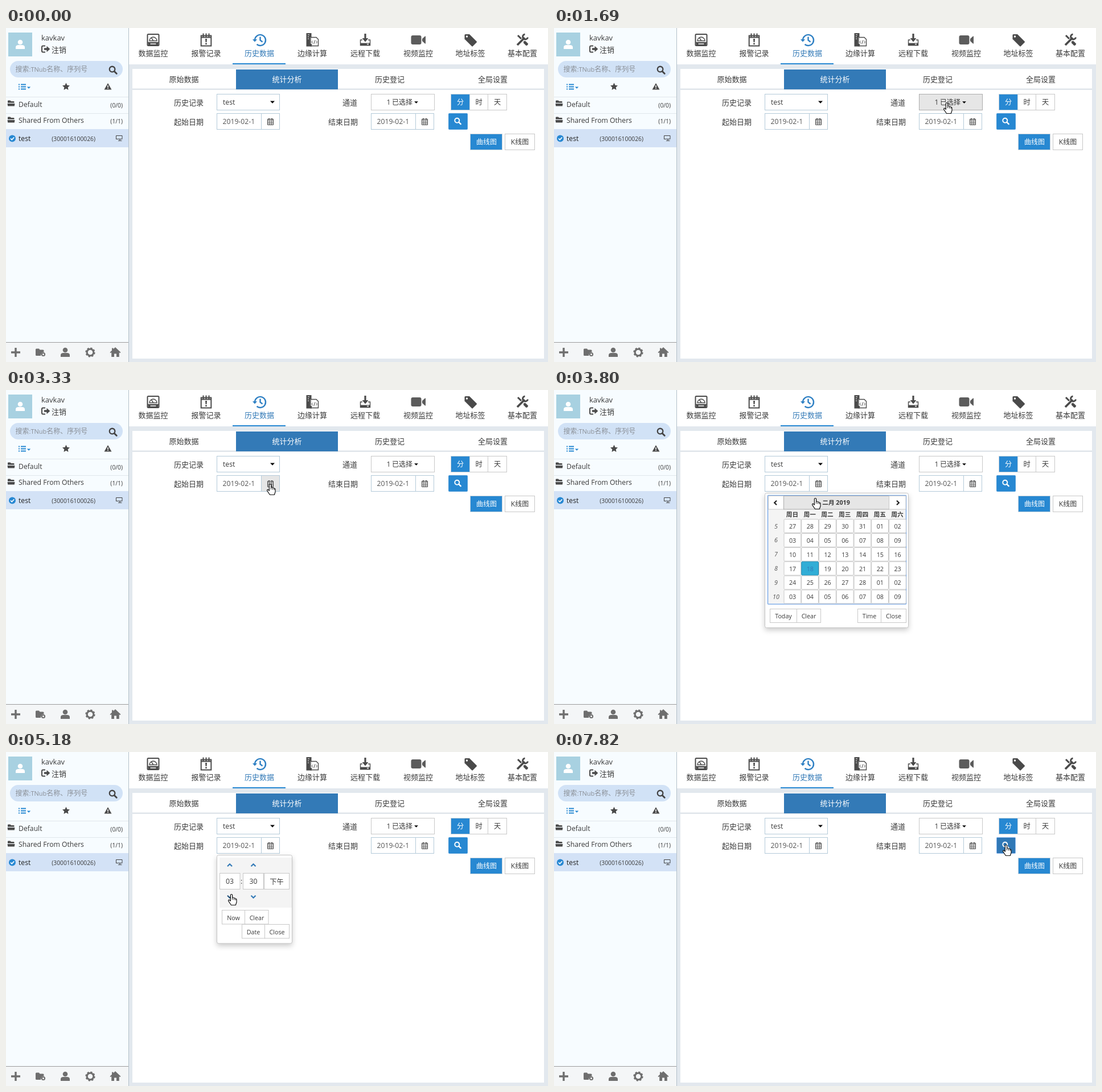
An HTML page for the animation above (7990 ms loop, 952x588 px).

```html
<!DOCTYPE html>
<html lang="zh-CN">
<head>
<meta charset="utf-8">
<title>Statistics</title>
<style>
html, body { margin: 0; width: 100%; height: 100%; overflow: hidden; background: #e2e8ee; }
svg { display: block; width: 952px; height: 588px; }
text { font: 12.2px "Open Sans", "Noto Sans CJK SC", "Noto Sans CJK", sans-serif; fill: #3a3a3a; }
.cn text, text.cn { font-size: 13px; }
.mid, .mid text { text-anchor: middle; }
.sm text, text.sm { font-size: 10.7px; }
text.tw { font-size: 12px; }
text.ten { font-size: 10.2px; }
.id { font-size: 10.3px; text-anchor: end; }
.bold { font-weight: 700; }
.week { font-style: italic; fill: #555; }
.w, .w text { fill: #fff; }
.blue { fill: #2788d2; }
.link { fill: #337ab7; }
.btn { fill: #fff; stroke: #c8c8c8; }
.on { fill: #2788d2; stroke: #c8d3dc; }
.field { fill: #fff; stroke: #b4cad9; }
.line { fill: none; stroke: #4a4a4a; stroke-width: 2; }
.thin { stroke-width: 1.4; }
.ico { fill: #4a4a4a; }
.foot { fill: #6e6e6e; }
.gear { fill: none; stroke: #6e6e6e; }
.pop { fill: #fff; stroke: #c4c4c4; filter: drop-shadow(0 4px 5px rgba(0,0,0,.2)); }
.chev { fill: none; stroke: #222; stroke-width: 2.2; }
.chev.c { stroke: #337ab7; }

/* every state switches hard within one 7990 ms loop */
.a { animation: 7990ms step-end infinite; }
#cursor { animation-name: move; }
#arrow { animation-name: arrow; }
#hand { animation-name: hand; }
#select { animation-name: select; }
#channel { animation-name: channel; }
#press { animation-name: press; }
#dateBtn { animation-name: dateBtn; }
#menu { animation-name: menu; }
#calendar { animation-name: calendar; }
#frame { --w: 252px; width: var(--w); animation-name: grow; }
#table { --w: 243px; width: var(--w); animation-name: grow, focus; }
#ends { animation-name: shift; }
#extra { animation-name: extra; }
#title { animation-name: title; }
#time { animation-name: time; }
#down { animation-name: down; }
#ring { animation-name: ring; }
#h3 { animation-name: h3; }
#h2 { animation-name: h2; }
#h1 { animation-name: h1; }
#search { animation-name: search; }

@keyframes move {
  0% { transform: translate(958px,634px); }
  1.62% { transform: translate(958px,634px); animation-timing-function: steps(2,jump-both); }
  3.7% { transform: translate(690px,413px); }
  4.75% { transform: translate(627px,430px); }
  6.63% { transform: translate(627px,430px); animation-timing-function: steps(6,jump-both); }
  12.51% { transform: translate(462px,142px); }
  13.47% { transform: translate(462px,142px); animation-timing-function: steps(3,jump-both); }
  16.39% { transform: translate(617px,133px); }
  17.27% { transform: translate(617px,133px); animation-timing-function: steps(4,jump-both); }
  21.15% { transform: translate(690px,131px); }
  30.91% { transform: translate(690px,131px); animation-timing-function: steps(3,jump-both); }
  33.79% { transform: translate(461px,251px); }
  36.66% { transform: translate(461px,251px); animation-timing-function: steps(5,jump-both); }
  41.67% { transform: translate(464px,165px); }
  47.55% { transform: translate(459px,190px); }
  48.52% { transform: translate(459px,190px); animation-timing-function: steps(5,jump-both); }
  53.31% { transform: translate(449px,312px); }
  55.19% { transform: translate(449px,312px); animation-timing-function: steps(2,jump-both); }
  57.31% { transform: translate(450px,264px); }
  58.19% { transform: translate(450px,264px); animation-timing-function: steps(7,jump-both); }
  64.83% { transform: translate(396px,250px); }
  84.31% { transform: translate(396px,250px); animation-timing-function: steps(5,jump-both); }
  89.11% { transform: translate(621px,234px); }
  91.11% { transform: translate(621px,234px); animation-timing-function: steps(6,jump-both); }
  96.9%, 100% { transform: translate(794px,163px); }
}
@keyframes hand {
  0%, 13.47%, 30.91%, 84.31% { opacity: 0; }
  12.51%, 18.23%, 40.67%, 96.9%, 100% { opacity: 1; }
}
@keyframes arrow {
  0%, 13.47%, 30.91%, 84.31% { opacity: 1; }
  12.51%, 18.23%, 40.67%, 96.9%, 100% { opacity: 0; }
}
@keyframes select {
  0%, 13.47%, 100% { fill: #fff; stroke: #b4cad9; }
  12.51% { fill: #e6e6e6; stroke: #b0bcc4; }
}
@keyframes channel {
  0%, 36.66%, 100% { fill: #fff; stroke: #c8c8c8; }
  18.23% { fill: #e6e6e6; stroke: #adadad; }
  25.15% { fill: #e2e2e2; stroke: #8c8c8c; }
}
@keyframes press { 0%, 36.66%, 100% { opacity: 0; } 25.15% { opacity: 1; } }
@keyframes dateBtn {
  0%, 47.55%, 100% { fill: #fff; }
  40.67% { fill: #e6e6e6; }
  43.55% { fill: #d6d6d6; }
}
@keyframes menu { 0%, 36.66%, 100% { opacity: 0; } 26.09% { opacity: 1; } }
@keyframes calendar { 0%, 58.19%, 100% { opacity: 0; } 45.43% { opacity: 1; } }
@keyframes grow { 55.19%, 100% { width: calc(var(--w) + 215px); } }
@keyframes focus { 0% { stroke: transparent; } 47.55%, 100% { stroke: #84b0ea; } }
@keyframes shift { 55.19%, 100% { transform: translate(215px,0); } }
@keyframes extra { 0%, 58.19%, 100% { opacity: 0; } 55.19% { opacity: 1; } }
@keyframes title {
  0%, 49.4%, 100% { fill: #fff; stroke: #c8c8c8; }
  47.55% { fill: #e6e6e6; stroke: #adadad; }
}
@keyframes time { 0%, 89.11%, 100% { opacity: 0; } 58.19% { opacity: 1; } }
@keyframes down { 0%, 84.31%, 100% { stroke: #337ab7; } 64.83% { stroke: #23527c; } }
@keyframes ring { 0%, 89.11%, 100% { opacity: 0; } 65.83% { opacity: 1; } }
@keyframes h3 { 0% { opacity: 1; } 67.83%, 100% { opacity: 0; } }
@keyframes h2 { 0%, 71.84%, 100% { opacity: 0; } 67.83% { opacity: 1; } }
@keyframes h1 { 0% { opacity: 0; } 71.84%, 100% { opacity: 1; } }
@keyframes search {
  0% { fill: #2788d2; stroke: #4897d6; }
  96.9% { fill: #3078b6; stroke: #2a6ca6; }
  97.87%, 100% { fill: #3078b6; stroke: #86b4ee; }
}
</style>
</head>
<body>
<svg viewBox="0 0 952 588">
<defs>
  <g id="lens"><circle cx="-1.2" cy="-1.2" r="4" fill="none" stroke-width="1.9"/><path d="M2 2L5.2 5.2" stroke-width="2.4" stroke-linecap="round"/></g>
  <g id="cal" fill="none" stroke="#444"><path d="M-5-4.5H5V5.5H-5Z"/><path d="M-5-2.5H5M-5 .5H5M-5 3H5M-1.7-2V5M1.7-2V5" stroke-width=".8"/><path d="M-2.5-6V-3.5M2.5-6V-3.5" stroke-width="1.7"/></g>
  <path id="tick" d="M-4.5 0L-1.5 3L4.5-3" fill="none" stroke="#222" stroke-width="2.6"/>
  <path id="caret" d="M-4-2H4L0 2.2Z"/>
  <path id="left" d="M2-3.8L-1.8 0L2 3.8"/>
  <path id="up" d="M-4 2.2L0-1.8L4 2.2"/>
  <path id="folder" d="M-6-4.5Q-6-5.5-5-5.5H-1.5L0-4H4.5Q5.5-4 5.5-3V-1.3H-6ZM-6.5 0H6.5L5.8 4.5H-5.8Z"/>
  <g id="person"><circle cy="-4" r="4.3"/><path d="M-8 8V5Q-8 1-3 1H3Q8 1 8 5V8Z"/></g>
</defs>

<rect width="952" height="588" fill="#e2e8ee"/>

<!-- sidebar -->
<rect width="215" height="588" fill="#f7fcff"/>
<rect x="4" y="8" width="42" height="42" fill="#a8d1e1"/>
<use href="#person" class="w" transform="translate(25 29)"/>
<text x="62" y="22" class="cn">kavkav</text>
<path d="M69 31.5H65Q63 31.5 63 33.5V40.5Q63 42.5 65 42.5H69" class="line"/>
<path d="M67 35.2H71.5V31.8L77.3 37L71.5 42.2V38.8H67Z" class="ico"/>
<text x="80" y="42.5" class="cn">注销</text>
<rect x="7" y="58" width="198" height="29" rx="14.5" fill="#d1e2f6"/>
<text x="16.5" y="77" class="tw" style="fill:#8a8f96">搜索<tspan font-size="11">:TNub</tspan>名称、序列号</text>
<use href="#lens" stroke="#444" transform="translate(188 74) scale(1.2)"/>
<path d="M22 99.5H24M22 103.5H24M22 107.5H24M26 99.5H35M26 103.5H35M26 107.5H35" stroke="#2788d2" stroke-width="2"/>
<use href="#caret" class="blue" transform="translate(40 105) scale(.8)"/>
<path d="M105.5 96.5L107.5 100.8L112 101.3L108.7 104.5L109.5 109L105.5 106.8L101.5 109L102.3 104.5L99 101.3L103.5 100.8Z" class="ico"/>
<path d="M179 97L185.5 108.5H172.5Z" class="ico"/>
<path d="M179 101V104.5M179 105.6V107" stroke="#fff" stroke-width="1.6"/>
<path d="M0 121.5H215M0 150.5H215" stroke="#e1e7eb"/>
<rect y="178" width="215" height="32" fill="#d3e2f6"/>
<g class="ico"><use href="#folder" x="9" y="133"/><use href="#folder" x="9" y="162"/></g>
<text x="22" y="139">Default</text>
<text x="205" y="140" class="id">(0/0)</text>
<text x="22" y="167">Shared From Others</text>
<text x="205" y="168" class="id">(1/1)</text>
<circle cx="11" cy="194.5" r="6" class="blue"/>
<path d="M8 194.5L10.3 196.8L14.2 192.5" fill="none" stroke="#fff" stroke-width="1.7"/>
<text x="22" y="199" style="fill:#222">test</text>
<text x="157" y="198.5" class="id">(300016100026)</text>
<path d="M193.5 195.5V189.5H204V195.5H196M200 196V198.5M197 198.5H203.5M193 195.5H196" fill="none" stroke="#444"/>
<rect y="553" width="215" height="35" fill="#f4f6f7"/>
<path d="M0 553.5H215" stroke="#9b9b9b"/>
<g class="foot">
  <path d="M15.3 563H18.7V569.3H25V572.7H18.7V579H15.3V572.7H9V569.3H15.3Z"/>
  <path d="M52 566Q52 564.5 53.5 564.5H58L59.5 566.5H65Q66.5 566.5 66.5 568V570.5Q62 570 61 577H53.5Q52 577 52 575.5Z"/>
  <circle cx="65.5" cy="574.5" r="2.6" class="gear" stroke-width="2"/>
  <use href="#person" x="104" y="571"/>
  <circle cx="148" cy="571" r="5.8" class="gear" stroke-width="3"/>
  <circle cx="148" cy="571" r="7.6" class="gear" stroke-width="2" stroke-dasharray="3.4 2.57"/>
  <path d="M192 562L201.5 571L200.3 572.3L198.8 571V579H194V573.5H190V579H185.2V571L183.7 572.3L182.5 571L186 567.7V563.5H188.5V565.3Z"/>
</g>
<path d="M215.5 0V588" stroke="#b3c0c9"/>

<!-- top navigation -->
<rect x="216" width="736" height="64" fill="#fff"/>
<rect x="398" y="62" width="93" height="2" class="blue"/>
<g transform="translate(258.5 21)">
  <rect x="-10" y="-10" width="20" height="20" rx="1.5" class="line"/>
  <path d="M-6.5 1.5A6.5 6.5 0 0 1 6.5 1.5Z" class="line thin"/>
  <path d="M0 1L-3-3.5M-10 4.5H10" class="line thin"/>
  <path d="M-9 5H9V9H-9Z" class="ico"/><path d="M-5 7H5" stroke="#fff" stroke-width="1.5"/>
</g>
<g transform="translate(351.5 21)">
  <rect x="-8.8" y="-7.5" width="17.6" height="18" class="line"/>
  <path d="M-9-4.5H9M-5-11.5V-5M0-11.5V-5M5-11.5V-5" class="line"/>
  <path d="M-1.5-2H1.5L1 4H-1ZM-1.3 5.5H1.3V8H-1.3Z" class="ico"/>
</g>
<g transform="translate(445.5 21)" fill="none" stroke="#2d7fc3" stroke-width="2.4">
  <path d="M-8.5 1A9.5 9.5 0 1 1-5 7.8"/><path d="M1-5.5V.5L5 3.5"/><path d="M-12.5-1H-4.5L-8.5 3.5Z" fill="#2d7fc3" stroke="none"/>
</g>
<g transform="translate(538 21)">
  <path d="M-10.5-12H-1.5V-5H-4V7H-1V11.5H-10.5Z" class="ico"/>
  <path d="M-8-9H-5M-8-5.5H-6M-8-2H-6" stroke="#fff"/>
  <path d="M-3-4.5H7L10.5-1V10.5H-3Z" class="line thin"/>
  <path d="M1 1.5L-1 3.7L1 6M6.5 1.5L8.5 3.7L6.5 6M4.7 .5L2.8 7" fill="none" stroke="#4a4a4a"/>
</g>
<g transform="translate(631 21)">
  <path d="M-1.6-11H1.6V-3H5.5L0 3.5L-5.5-3H-1.6Z" class="ico"/>
  <path d="M-5 0H-8.5V9.5H8.5V0H5" class="line thin"/><path d="M-8 5.5H8V9.5H-8Z" class="ico"/><path d="M3 7.5H6" stroke="#fff" stroke-width="1.5"/>
</g>
<g transform="translate(724 21)" fill="#5c5c5c"><rect x="-12.5" y="-8" width="18" height="16" rx="3"/><path d="M7-2L12-6.5H13V6.5H12L7 2Z"/></g>
<g transform="translate(815.5 21)"><path d="M-10-8.5Q-10-10-8.5-10H-1.5L11 2.5Q12 3.5 11 4.5L4.5 11Q3.5 12 2.5 11L-10-1.5Z" class="ico"/><circle cx="-6" cy="-6" r="1.7" class="w"/></g>
<g transform="translate(907 21)" class="line" style="stroke-width:3">
  <path d="M-8-8L-2-2M2.5 2.5L9 9"/><path d="M-9 9L4-4" stroke-width="3.8"/><path d="M4.5-10A4.5 4.5 0 1 0 9.5-4.5"/><path d="M3.5 3.5L8.5 8.5" stroke-width="5"/>
</g>
<g class="cn mid">
  <text x="258.5" y="49">数据监控</text><text x="351.5" y="49">报警记录</text>
  <text x="445" y="49" class="link">历史数据</text><text x="538" y="49">边缘计算</text>
  <text x="631" y="49">远程下载</text><text x="724" y="49">视频监控</text>
  <text x="815.5" y="49">地址标签</text><text x="907" y="49">基本配置</text>
</g>

<!-- panel and tabs -->
<rect x="222" y="72" width="723" height="510" fill="#fff"/>
<rect x="222" y="106.5" width="723" height="2.5" fill="#dfe5ea"/>
<rect x="404" y="73" width="179" height="35" class="link"/>
<g class="cn mid">
  <text x="312.5" y="95">原始数据</text><text x="493.5" y="95" class="w">统计分析</text>
  <text x="674" y="95">历史登记</text><text x="855" y="95">全局设置</text>
</g>

<!-- form -->
<g class="cn">
  <text x="295" y="136">历史记录</text><text x="591" y="136">通道</text>
  <text x="295" y="170">起始日期</text><text x="566" y="170">结束日期</text>
</g>
<rect id="select" class="field a" x="370.5" y="116.5" width="110" height="28"/>
<text x="381" y="135">test</text>
<use href="#caret" x="468" y="130.5"/>
<rect id="channel" class="btn a" x="641.5" y="116.5" width="111" height="28"/>
<path id="press" class="a" d="M642 118H752M642.5 118V144" stroke="#bbb" stroke-width="2" fill="none"/>
<text x="668.5" y="135">1</text><text x="678" y="135" class="tw">已选择</text>
<use href="#caret" transform="translate(720.5 131) scale(.85)"/>
<rect class="field" x="370.5" y="150.5" width="78" height="28"/>
<rect id="dateBtn" class="field a" x="448.5" y="150.5" width="32" height="28"/>
<rect class="field" x="641.5" y="150.5" width="78" height="28"/>
<rect class="field" x="719.5" y="150.5" width="32" height="28"/>
<text x="380.5" y="169" style="fill:#555">2019-02-1</text>
<text x="651.5" y="169" style="fill:#555">2019-02-1</text>
<use href="#cal" x="464.5" y="165"/><use href="#cal" x="735.5" y="165"/>
<rect class="btn" x="814.5" y="116.5" width="32" height="28"/>
<rect class="btn" x="846.5" y="116.5" width="33" height="28"/>
<rect class="on" x="781.5" y="116.5" width="33" height="28"/>
<g class="mid">
  <text x="798" y="135" class="w">分</text><text x="830.5" y="135">时</text><text x="863" y="135">天</text>
</g>
<rect id="search" class="a" x="777.5" y="150.5" width="33" height="28" rx="1"/>
<use href="#lens" stroke="#fff" x="793.5" y="164"/>
<rect class="on" x="815.5" y="186.5" width="56" height="28"/>
<rect class="btn" x="876.5" y="186.5" width="52" height="28"/>
<g class="mid"><text x="844" y="205" class="w tw">曲线图</text><text x="902.5" y="205" class="tw">K线图</text></g>

<!-- channel menu -->
<g id="menu" class="a">
  <rect class="pop" x="641.5" y="147.5" width="132" height="248" rx="3"/>
  <path d="M642 203.5H773" stroke="#e0e0e0"/>
  <use href="#tick" x="661" y="164"/><use href="#tick" x="661.5" y="216.5"/>
  <path d="M657.5 186.5L664 193M664 186.5L657.5 193" stroke="#222" stroke-width="2.6"/>
  <text x="668" y="168" class="ten">选择全部</text>
  <text x="668" y="194" class="ten">取消全选</text>
  <text x="671" y="221">text</text>
</g>

<!-- date picker -->
<g id="calendar" class="a sm mid">
  <rect id="frame" class="pop a" x="370.5" y="181.5" height="237" rx="3"/>
  <rect id="table" class="a" x="375.5" y="185.5" height="191.5" rx="1" fill="#f4f4f4" stroke-width="1.6"/>
  <rect class="btn" x="376.5" y="186.5" width="27" height="23.5"/>
  <rect id="title" class="btn a" x="403.5" y="186.5" width="185" height="23.5"/>
  <rect class="btn" x="588.5" y="186.5" width="29.5" height="23.5"/>
  <use href="#left" class="chev" x="389" y="198.5"/>
  <use href="#left" class="chev" transform="translate(604 198.5) scale(-1 1)"/>
  <text x="495.5" y="202" class="bold">二月 2019</text>
  <g id="days"></g>
  <g id="extra" class="a"></g>
  <rect class="btn" x="379.5" y="385.5" width="47" height="24"/><text x="403" y="402">Today</text>
  <rect class="btn" x="426.5" y="385.5" width="42" height="24"/><text x="447.5" y="402">Clear</text>
  <g id="ends" class="a">
    <rect class="btn" x="533.5" y="385.5" width="41" height="24"/><text x="554" y="402">Time</text>
    <rect class="btn" x="574.5" y="385.5" width="44" height="24"/><text x="596.5" y="402">Close</text>
  </g>
</g>

<!-- time picker -->
<g id="time" class="a mid">
  <rect class="pop" x="370.5" y="181.5" width="132" height="155.5" rx="3"/>
  <rect x="375" y="186" width="127" height="88" fill="#f4f4f4"/>
  <rect id="ring" class="a" x="376.5" y="241.5" width="34" height="29" fill="#fff" stroke="#84b0ea" stroke-width="1.4"/>
  <rect class="btn" x="375.5" y="213.5" width="35.5" height="28"/>
  <rect class="btn" x="416.5" y="213.5" width="36" height="28"/>
  <rect class="btn" x="453.5" y="213.5" width="44" height="28"/>
  <use href="#up" class="chev c" x="393" y="199"/><use href="#up" class="chev c" x="434.5" y="199"/>
  <use id="down" href="#up" class="chev c a" transform="translate(393 255) scale(1 -1)"/>
  <use href="#up" class="chev c" transform="translate(434.5 255) scale(1 -1)"/>
  <text id="h3" class="a" x="393" y="232">03</text><text id="h2" class="a" x="393" y="232">02</text><text id="h1" class="a" x="393" y="232">01</text>
  <text x="413.5" y="232">:</text><text x="434.5" y="232">30</text><text x="475.5" y="232.5">下午</text>
  <g class="sm">
    <rect class="btn" x="379.5" y="278.5" width="40" height="24.5"/><text x="399.5" y="295.5">Now</text>
    <rect class="btn" x="419.5" y="278.5" width="41.5" height="24.5"/><text x="440.5" y="295.5">Clear</text>
    <rect class="btn" x="414.5" y="303.5" width="40" height="24.5"/><text x="434.5" y="320.5">Date</text>
    <rect class="btn" x="454.5" y="303.5" width="43" height="24.5"/><text x="476" y="320.5">Close</text>
  </g>
</g>

<g id="cursor" class="a" fill="#fff" stroke="#111" stroke-linejoin="round">
  <path id="arrow" class="a" d="M0 0V15L3.4 11.9L5.8 17.2L8 16.2L5.7 11H10.3Z"/>
  <g id="hand" class="a">
    <path d="M-1.6 1.6Q0-.6 1.6 1.6V6.3Q3.6 5.4 4.5 7.2Q6.4 6.5 7.2 8.3Q9 8.2 9 10V14.5L7.3 19.5H-.5L-4.8 13.2Q-6.2 10.5-4 10.1L-1.6 12.2Z" stroke-width="1.2"/>
    <path d="M1.6 6V10M4.5 7.5V10.5M7.2 8.5V11" fill="none"/>
  </g>
</g>
</svg>
<script>
const COL = 30.75, ROW = 24.9;
const label = (x, y, text, cls = "") => `<text x="${x}" y="${y}" class="${cls}">${text}</text>`;

// six weeks starting on Sunday 27 January 2019
function cells(left, pickedStyle) {
  let out = "";
  for (let i = 0; i < 42; i++) {
    const x = left + i % 7 * COL, y = 227.5 + Math.floor(i / 7) * ROW;
    const day = String(new Date(2019, 0, 27 + i).getDate()).padStart(2, "0");
    const picked = day === "18";
    out += `<rect class="btn" x="${x}" y="${y}" width="${COL - 1}" height="${ROW - 1}" rx="1.5" style="${picked ? pickedStyle : ""}"/>`
      + label(x + 15, y + 16.3, day, picked ? "link" : "");
  }
  return out;
}

let heads = "";
[..."日一二三四五六"].forEach((d, i) => heads += label(418.5 + i * COL, 223, "周" + d, "bold"));
for (let r = 0; r < 6; r++) heads += label(390, 243.5 + r * ROW, 5 + r, "week");

document.getElementById("days").innerHTML = heads + cells(404, "fill:#31add6;stroke:#1f8db6");
document.getElementById("extra").innerHTML = cells(404 + 7 * COL, "fill:#e6e6e6;stroke:#9a9a9a");
</script>
</body>
</html>
```
